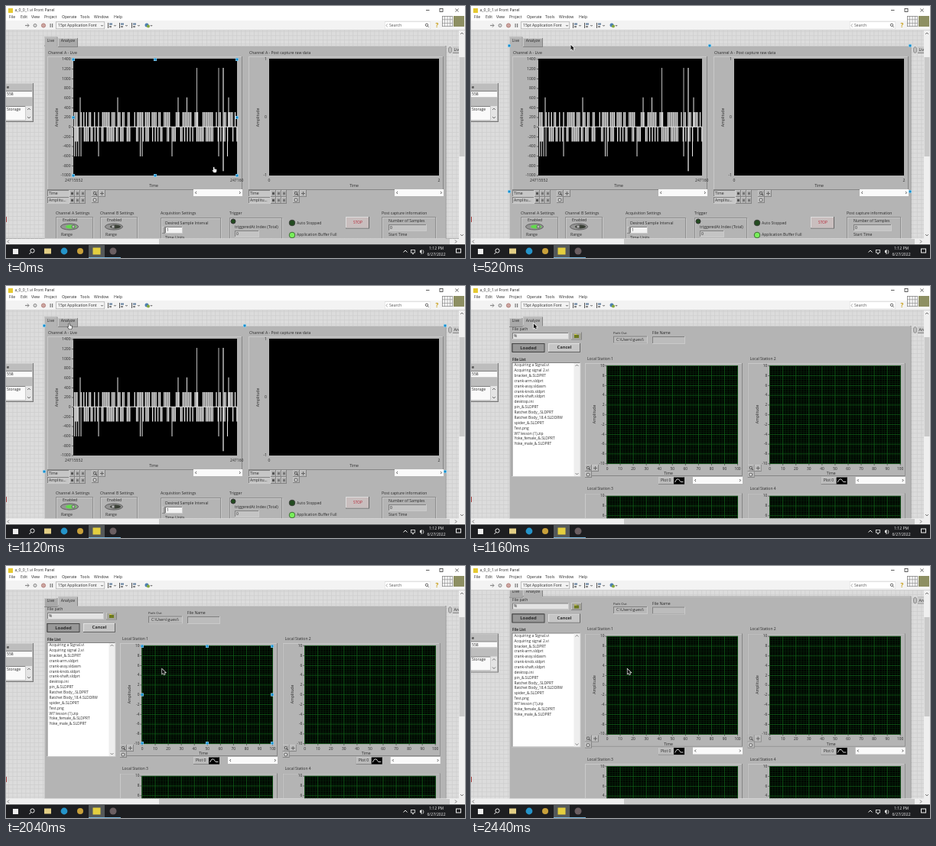
An HTML page with a canvas for the animation above (2.48 s loop, 600x330 px).

```html
<!DOCTYPE html>
<html lang="en">
<head>
<meta charset="utf-8">
<style>
html, body { margin: 0; width: 600px; height: 330px; overflow: hidden; background: #000; }
canvas { display: block; }
</style>
</head>
<body>
<canvas id="stage" width="600" height="330"></canvas>
<script>
const ctx = document.getElementById('stage').getContext('2d');
const LOOP = 2480, PAGE_SWITCH = 1160, SCROLL_AT = 2360, SCROLL = 12.5;
const PANEL = '#b4b4b4', INK = '#2a2a2a';

const rect = (x, y, w, h, color) => {
  ctx.fillStyle = color;
  ctx.fillRect(x, y, w, h);
};

const line = (points, color = INK, width = 1) => {
  ctx.beginPath();
  points.forEach(([x, y]) => ctx.lineTo(x, y));
  ctx.strokeStyle = color;
  ctx.lineWidth = width;
  ctx.stroke();
};

const ellipse = (x, y, rx, ry, color, edge) => {
  ctx.beginPath();
  ctx.ellipse(x, y, rx, ry, 0, 0, 7);
  ctx.fillStyle = color;
  ctx.fill();
  if (edge) {
    ctx.strokeStyle = edge;
    ctx.lineWidth = 1;
    ctx.stroke();
  }
};
const disc = (x, y, r, color, edge) => ellipse(x, y, r, r, color, edge);

const outline = (x, y, w, h, color, width = 1) => {
  ctx.strokeStyle = color;
  ctx.lineWidth = width;
  ctx.strokeRect(x, y, w, h);
};

// Text is laid out large and scaled down so small advances stay fractional.
function text(s, x, y, { size = 5.1, align = 'left', color = INK, bold = false, angle = 0 } = {}) {
  ctx.save();
  ctx.translate(x, y);
  ctx.rotate(angle);
  ctx.scale(0.125, 0.125);
  ctx.font = `${bold ? 'bold ' : ''}${size * 8}px "Open Sans", "Noto Sans", sans-serif`;
  ctx.textAlign = align;
  ctx.textBaseline = 'middle';
  ctx.fillStyle = color;
  ctx.fillText(s, 0, 0);
  ctx.restore();
}

function bevel(x, y, w, h, fill, light = '#c9c9c9', dark = '#858585') {
  rect(x, y, w, h, dark);
  rect(x, y, w - 1, h - 1, light);
  rect(x + 1, y + 1, w - 2, h - 2, fill);
}
const sunken = (x, y, w, h, fill) => bevel(x, y, w, h, fill, '#808080', '#cacaca');

function group(x, y, w, h) {
  outline(x + 1.5, y + 1.5, w, h, '#c6c6c6');
  outline(x + 0.5, y + 0.5, w, h, '#8f8f8f');
}

function scroller(x, y, w) {
  rect(x, y, w, 9, '#fafafa');
  line([[x + 4, y + 3], [x + 2.5, y + 4.5], [x + 4, y + 6]], '#333', 0.8);
  line([[x + w - 4, y + 3], [x + w - 2.5, y + 4.5], [x + w - 4, y + 6]], '#333', 0.8);
}

function palette(x, y) {
  bevel(x, y, 9, 9, '#aaa');
  bevel(x + 9, y, 9, 9, '#bbb');
  bevel(x, y + 9, 9, 8, '#b4b4b4');
  disc(x + 4, y + 4, 1.5, '#ddd', '#555');
  line([[x + 5, y + 5], [x + 7, y + 7]]);
  line([[x + 11, y + 4.5], [x + 16, y + 4.5]], '#555', 0.8);
  line([[x + 13.5, y + 2], [x + 13.5, y + 7]], '#555', 0.8);
  disc(x + 4, y + 13, 2, '#ddd', '#666');
}

function handles(x0, y0, x1, y1) {
  for (const u of [0, 0.5, 1]) for (const v of [0, 0.5, 1]) {
    if (u === 0.5 && v === 0.5) continue;
    const x = x0 + (x1 - x0) * u, y = y0 + (y1 - y0) * v;
    rect(x - 2, y - 2, 4, 4, '#b9e2f5');
    rect(x - 1.5, y - 1.5, 3, 3, '#158ccc');
  }
}

// Readings snap to multiples of one quantum, mostly one step from zero.
function signal() {
  const quantum = 305;
  let seed = 19;
  const random = () => (seed = seed * 16807 % 2147483647) / 2147483647;
  const yOf = a => 158.3 - a * 152 / 2400;
  const bar = (x, steps, w = 1, color = '#e8e8e8') =>
    line([[x, yOf(0)], [x, yOf(steps * quantum)]], color, w);
  rect(88, 157.7, 214, 1.2, '#c4c4c4');
  for (let x = 89.5; x < 302; x += 1.75) {
    const beat = Math.sin(x * 0.95) * 0.25;
    if (random() < 0.6 + beat) bar(x, 1, 1.3);
    if (random() < 0.56 - beat) bar(x + 0.6, -1, 1.3);
  }
  [97, 146, 225, 236.5, 291].forEach(x => bar(x, 2));
  [89.5, 92, 95, 98, 121, 175.5, 178, 217, 278, 289.5].forEach(x => bar(x, -2));
  [249.5, 278].forEach(x => bar(x, 4, 1, '#bbb'));
  bar(284, 4, 1.2);
  bar(284, -3, 1.3);
}

function livePlot(x, title) {
  text(title, x + 1, 62);
  bevel(x, 66, 255, 175, PANEL);
  for (const [i, name] of ['Time', 'Amplitu...'].entries()) {
    const y = 241 + i * 9;
    sunken(x, y, 29, 9, '#c6c6c6');
    text(name, x + 2, y + 4.5);
    for (let k = 0; k < 3; k++) {
      bevel(x + 29 + k * 7, y, 7, 9, '#adadad');
      rect(x + 31 + k * 7, y + 3, 3, 3, k ? '#777' : '#555');
    }
  }
  palette(x + 58, 241);
  scroller(x + 191, 240, 64);
}

function toggle(x, on) {
  ellipse(x, 289, 11.5, 4, '#949494', '#606060');
  ellipse(x + 2, 289, 7, 2.4, on ? '#62d94c' : '#3a4036');
  disc(x + (on ? 5 : -1), 289, 2, '#bbb', '#666');
}

function channelSettings(x, name, on) {
  text(`Channel ${name} Settings`, x, 272);
  group(x, 276, 48, 50);
  text('Enabled', x + 9, 281);
  toggle(x + 18, on);
  text('Range', x + 7, 299.5);
}

const vertical = { align: 'center', angle: -Math.PI / 2 };

function livePage() {
  livePlot(54, 'Channel A - Live');
  rect(88, 69, 214, 153, '#000');
  for (let a = 1400; a >= -1000; a -= 200) {
    const y = 70 + (1400 - a) * 152 / 2400;
    text(String(a), 84.5, y, { align: 'right', size: 5 });
    rect(86, y - 0.4, 2, 0.8, '#444');
  }
  text('24715552', 77, 229);
  text('247160', 293, 229);
  text('Time', 193, 236, { align: 'center' });
  text('Amplitude', 67, 146, vertical);
  signal();

  livePlot(317, 'Channel A - Post capture raw data');
  rect(344, 69, 222, 153, '#000');
  [['1', 70], ['0', 146], ['-1', 222]].forEach(([s, y]) => text(s, 341, y, { align: 'right' }));
  text('0', 344, 229, { align: 'center' });
  text('2', 566, 229, { align: 'center' });
  text('Time', 455, 236, { align: 'center' });
  text('Amplitude', 330, 146, vertical);

  channelSettings(65, 'A', true);
  channelSettings(123, 'B', false);

  text('Acquisition Settings', 202, 272);
  group(202, 277, 78, 50);
  text('Desired Sample Interval', 208, 285);
  bevel(204, 289, 4, 9, '#aaa');
  sunken(208, 289, 23, 9, '#f2f2f2');
  text('1', 210, 294);
  text('Time Units', 208, 304);

  text('Trigger', 292, 272);
  group(292, 277, 68, 50);
  disc(297, 282, 3, '#234b20', '#333');
  text('triggeredAt Index (Total)', 299, 290);
  sunken(299, 294, 32, 9, '#c4c4c4');
  text('0', 301, 299);

  disc(374, 284, 3.8, '#234b20', '#3b403a');
  text('Auto Stopped', 380, 284.5);
  disc(374, 300, 3.8, '#79ef5b', '#3d6c35');
  text('Application Buffer Full', 380, 300);

  bevel(444, 276, 31, 15.5, '#c9bebe', '#ddd', '#666');
  text('STOP', 460, 284, { align: 'center', color: '#b42334', size: 4.8 });

  text('Post capture information', 491, 272);
  group(491, 276, 70, 50);
  text('Number of Samples', 500, 282);
  sunken(500, 286, 50, 9, '#c4c4c4');
  text('0', 502, 291);
  text('Start Time', 500, 299.5);
}

function station(x, y, number) {
  ctx.save();
  ctx.translate(x, y);
  text('Local Station ' + number, 152, 95.5, { size: 5 });
  bevel(149, 101, 206, 148, PANEL);
  rect(177.5, 104.5, 171.5, 128.5, '#000');
  for (const [parts, color] of [[50, '#07280b'], [10, '#116019']]) {
    for (let i = 0; i <= parts; i++) {
      const px = 178 + i * 170.5 / parts, py = 104.7 + i * 128 / parts;
      rect(px - 0.35, 104.5, 0.7, 128.5, color);
      rect(177.5, py - 0.35, 171.5, 0.7, color);
    }
  }
  for (let i = 0; i <= 10; i++) {
    const px = 178 + i * 17.05, py = 104.7 + i * 12.8;
    text(String(10 - 2 * i), 174.5, py, { align: 'right', size: 4.8 });
    rect(175.5, py - 0.4, 2, 0.8, '#555');
    text(String(i * 10), px, 239.5, { align: 'center', size: 4.8 });
    rect(px - 0.4, 233, 0.8, 2, '#555');
  }
  text('Time', 258, 246, { align: 'center' });
  text('Amplitude', 161.5, 168, vertical);
  palette(149, 234);
  bevel(245, 250, 34, 10, '#bbb');
  text('Plot 0', 248, 255);
  rect(265, 250.5, 14, 9, '#000');
  line([[266.5, 257], [269, 253], [271.5, 253], [274, 256.5], [277.5, 256.5]], '#fff', 0.8);
  scroller(290, 250, 65);
  ctx.restore();
}

const FILES = ['Acquiring a Signal.vi', 'Acquiring signal 2.vi', 'bracket_&.SLDPRT', 'crank-arm.sldprt',
  'crank-assy.sldasm', 'crank-knob.sldprt', 'crank-shaft.sldprt', 'desktop.ini', 'pin_&.SLDPRT',
  'Ratchet Body_.SLDPRT', 'Ratchet Body_18.4.SLDDRW', 'spider_&.SLDPRT', 'Test.png',
  'W7 lesson (1).zip', 'Yoke_female_&.SLDPRT', 'Yoke_male_&.SLDPRT'];

function analyzePage() {
  text('File path', 54, 57);
  sunken(54, 61, 74, 9, '#e3e3e3');
  text('%', 56, 65.5);
  bevel(131, 60.5, 14, 10, '#a4a49a');
  rect(135, 64, 6, 4, '#6d7a1d');
  rect(135, 63, 3, 1, '#d9cf53');

  text('Path Out', 186, 62, { size: 4.3 });
  sunken(186, 65.5, 45, 10, '#bababa');
  text('C:\\Users\\guest\\', 190, 70.5, { size: 5 });
  text('File Name', 237, 62);
  sunken(237, 66, 43, 10, '#bcbcbc');

  bevel(53.5, 75, 43, 12, '#989898', '#444', '#444');
  text('Loaded', 75, 81, { bold: true, size: 5.9, align: 'center' });
  bevel(101, 75, 42, 12, '#c6c6c6', '#e2e2e2', '#666');
  text('Cancel', 122, 81, { bold: true, size: 5.7, align: 'center' });

  text('File List', 54, 96.5, { bold: true, size: 4.6 });
  sunken(53.5, 100, 90, 150, '#fff');
  rect(134.5, 101, 8, 148, '#eee');
  line([[136.5, 105], [138.5, 103], [140.5, 105]], '#666', 0.8);
  line([[136.5, 245], [138.5, 247], [140.5, 245]], '#666', 0.8);
  FILES.forEach((name, i) => text(name, 56.5, 104 + i * 6.87, { size: 4.9 }));

  station(0, 0, 1);
  station(212.7, 0, 2);
  station(0, 170.5, 3);
  station(212.7, 170.5, 4);
}

function sideControls(t) {
  bevel(-2, 101, 38, 51, '#bdbdbd', '#ccc', '#777');
  text('e', 1, 107, { bold: true });
  sunken(-1, 111, 36, 9, '#fafafa');
  text('558', 1, 116);
  sunken(-1, 131, 27, 19, '#fafafa');
  text('Storage', 1, 135.5);
  rect(26, 131, 8, 19, '#e4e4e4');
  line([[28, 136], [30, 134], [32, 136]], '#555', 0.8);
  line([[28, 145], [30, 147], [32, 145]], '#555', 0.8);

  ellipse(580.5, 57.5, 2, 4, '#c4c4c4', '#888');
  bevel(584, 53, 16, 9, '#c9c9c9');
  text(t < 1100 ? 'Live' : 'Analyze', 585.5, 58);
}

function selection(t) {
  if (t < 400) handles(88, 70, 302, 222);
  else if (t < 480) handles(54, 67, 308, 241);
  else if (t < PAGE_SWITCH) handles(50, 52, 574, 434);
  else if (t >= 1520 && t < 1800) handles(150, 102, 353, 249);
  else if (t >= 1800 && t < SCROLL_AT) handles(178, 105, 348, 232);
}

function workspace(t) {
  ctx.save();
  ctx.beginPath();
  ctx.rect(0, 32, 592, 272.5);
  ctx.clip();
  ctx.translate(0, t >= SCROLL_AT ? -SCROLL : 0);
  rect(0, 20, 592, 310, '#dcdcdc');
  for (let x = 3; x < 592; x += 5.63) rect(x, 20, 0.7, 310, '#cdcdcd');
  for (let y = 22; y < 330; y += 5.5) rect(0, y, 592, 0.7, '#cdcdcd');
  sideControls(t);

  const analyzing = t >= PAGE_SWITCH;
  const tab = (x, w, label, active) => {
    bevel(x, active ? 40.5 : 42, w, 12, active ? PANEL : '#a9a9a9');
    text(label, x + 3.7, 46);
  };
  bevel(50, 52, 525.5, 400, PANEL);
  tab(50, 17.5, 'Live', !analyzing);
  tab(68, 26, 'Analyze', analyzing);
  rect(analyzing ? 69 : 51, 51, analyzing ? 24 : 15.5, 3, PANEL);
  if (analyzing) analyzePage(); else livePage();
  selection(t);
  ctx.restore();
}

function toolbar() {
  rect(0, 19, 600, 13, '#f3f3f3');
  rect(0, 31.3, 600, 0.7, '#c4c4c4');
  line([[25, 25.5], [30, 25.5]], '#888', 1.2);
  line([[28, 23.3], [30, 25.5], [28, 27.7]], '#888');
  disc(38, 25.5, 2, '#ddd', '#888');
  disc(49, 25.5, 2.6, '#cda5a0', '#b58480');
  rect(57.5, 23, 1.2, 5, '#777');
  rect(60, 23, 1.2, 5, '#777');
  outline(65.3, 20.8, 63.4, 9, '#aaa', 0.7);
  text('15pt Application Font', 68, 25.5);
  const arrowDown = x => line([[x - 1.2, 25], [x, 26.3], [x + 1.2, 25]], '#333', 0.8);
  arrowDown(125.5);
  for (const x of [135, 150, 166]) {
    rect(x - 2, 22, 1, 7, '#555');
    rect(x, 22.5, 4, 2.2, '#6b86a3');
    rect(x, 26, 3, 2.2, '#888');
    arrowDown(x + 7.5);
  }
  disc(184, 25, 2.5, '#4f80b0');
  disc(186, 26.5, 2, '#86a93e');
  arrowDown(190);

  outline(495.3, 20.8, 59.4, 9, '#d4d4d4', 0.7);
  rect(495.6, 21.1, 58.8, 8.4, '#fff');
  line([[498.5, 23.5], [497, 25.5], [498.5, 27.5]], '#888', 0.7);
  text('Search', 501, 25.5, { color: '#555' });
  disc(550, 24.8, 1.7, '#fff', '#666');
  line([[551.3, 26.1], [553, 28]], '#666', 0.8);
  text('?', 563.5, 25.5, { bold: true, size: 8, align: 'center', color: '#c8a018' });
}

function windowFrame() {
  rect(0, 0, 600, 20, '#fff');
  toolbar();
  rect(3, 3, 6, 6, '#e5c92f');
  text('a_0_0_1.vi Front Panel', 11.5, 6);
  line([[549, 5.5], [553.5, 5.5]], '#333', 0.8);
  outline(567, 3.5, 4, 4, '#333', 0.8);
  line([[587.5, 3.5], [591.5, 7.5]], '#333', 0.8);
  line([[591.5, 3.5], [587.5, 7.5]], '#333', 0.8);
  [['File', 4], ['Edit', 19], ['View', 33], ['Project', 50], ['Operate', 73], ['Tools', 97],
    ['Window', 115], ['Help', 141]].forEach(([s, x]) => text(s, x, 15));

  rect(570, 13, 14, 14, '#777');
  for (let i = 0; i < 4; i++) for (let j = 0; j < 3; j++)
    rect(570.7 + i * 3.3, 13.7 + j * 4.4, 2.8, 3.9, '#f6f6f6');
  rect(585, 13, 14, 14, '#8d8f62');

  rect(592, 32, 8, 273, '#efefef');
  rect(592.5, 67, 7, 130, '#c9c9c9');
  line([[594, 37], [596, 35], [598, 37]], '#555', 0.8);
  line([[594, 299], [596, 301], [598, 299]], '#555', 0.8);
  rect(0, 304.5, 600, 8, '#efefef');
  rect(200, 305, 380, 7, '#c9c9c9');
  line([[4, 306.5], [2, 308.5], [4, 310.5]], '#555', 0.8);
  line([[587, 306.5], [589, 308.5], [587, 310.5]], '#555', 0.8);
  rect(0, 276, 1, 7, '#a44');
}

function taskbar() {
  const white = '#eee', base = '#1d1e21';
  rect(0, 312.5, 600, 17.5, base);
  rect(9, 318, 7, 7, white);
  disc(34.5, 320.5, 2.6, base, white);
  line([[32.5, 322.5], [30.5, 325]], white);
  rect(50, 317.5, 9, 7, '#e3cf86');
  disc(76, 321, 4.4, '#2594c9');
  disc(97, 321, 4, '#c9a13a');
  rect(108, 313, 21, 17, '#54585a');
  rect(113.5, 316.5, 10, 9, '#e4cf3f');
  rect(108, 329, 42, 1, '#78b6dc');
  disc(140, 321, 4.5, '#6b5f62');

  line([[519.5, 322.5], [522, 320], [524.5, 322.5]], white);
  outline(529.5, 319.5, 5, 3.5, white, 0.8);
  rect(531, 324, 2, 1, white);
  rect(541, 320, 2, 3, white);
  line([[543, 319], [543, 325]], white);
  line([[545, 319.5], [546, 322], [545, 324.5]], white, 0.8);
  text('1:12 PM', 562.5, 317.3, { align: 'center', color: white });
  text('6/27/2022', 562.5, 326, { align: 'center', color: white });
  outline(588.5, 318, 6, 5, white);
}

// Pointer stops: time, x, y.
const PATH = [[0, 271, 211], [80, 271, 211], [480, 131, 51], [560, 130, 51], [1000, 82, 50],
  [1240, 82, 49], [1640, 184, 129], [1720, 184, 129], [1960, 204, 135], [2480, 204.5, 135]];
const ARROW = [[0, 0], [0, 6.2], [1.5, 5], [2.5, 7.3], [3.7, 6.8], [2.7, 4.6], [4.6, 4.5]];
const HAND = [[0, 0], [1.2, 0], [1.4, 2.4], [4.2, 3], [4.2, 5.4], [3.4, 7], [0.6, 7], [-1.4, 4.2], [0, 4]];

function pointer(t) {
  const i = PATH.findIndex(p => p[0] > t);
  const [t0, x0, y0] = PATH[i - 1], [t1, x1, y1] = PATH[i];
  const u = (t - t0) / (t1 - t0), ease = u * u * (3 - 2 * u);
  const pointing = t < 400 || (t > 1000 && t < PAGE_SWITCH);
  ctx.save();
  ctx.translate(x0 + (x1 - x0) * ease, y0 + (y1 - y0) * ease);
  ctx.beginPath();
  (pointing ? HAND : ARROW).forEach(([x, y]) => ctx.lineTo(x, y));
  ctx.closePath();
  ctx.fillStyle = pointing ? '#eee' : '#111';
  ctx.strokeStyle = pointing ? '#333' : '#fff';
  ctx.lineWidth = 1.2;
  ctx.stroke();
  ctx.fill();
  ctx.restore();
}

function draw(now) {
  const t = now % LOOP;
  workspace(t);
  windowFrame();
  taskbar();
  pointer(t);
  requestAnimationFrame(draw);
}
requestAnimationFrame(draw);
</script>
</body>
</html>
```
